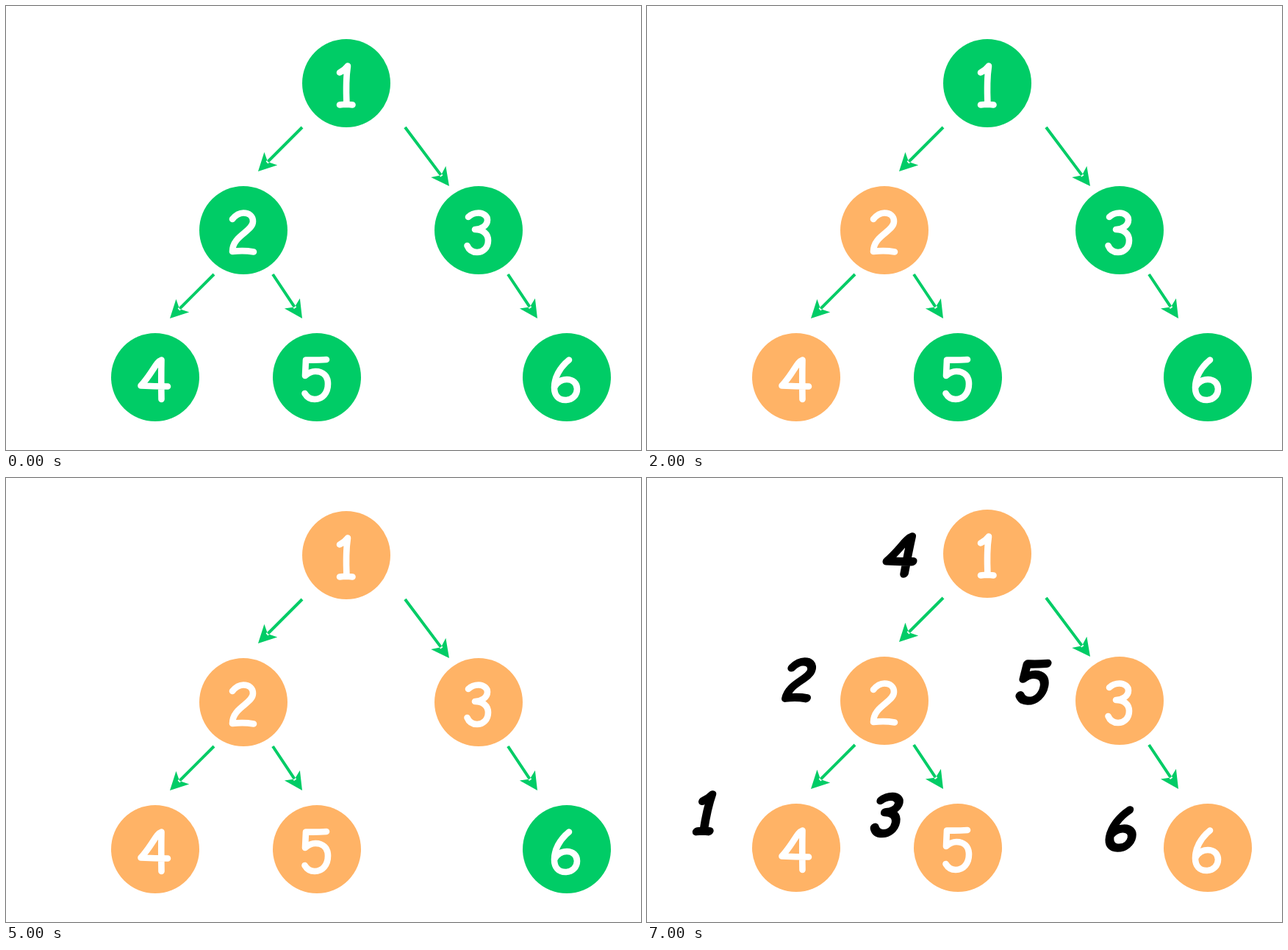
An HTML page that plays this animation: 864x604 px, repeating every 8000 ms.

```html
<!DOCTYPE html>
<html lang="en">
<head>
<meta charset="utf-8">
<title>In-order tree traversal</title>
<style>
  html, body { margin: 0; width: 100%; height: 100%; overflow: hidden; background: #fff; }
  svg { display: block; }
  .digit { fill: none; stroke: #fff; stroke-width: 8.6; stroke-linecap: round; stroke-linejoin: round; }
  .order .digit { stroke: #000; stroke-width: 12; }
</style>
</head>
<body>
<svg width="864" height="604" viewBox="0 0 864 604"><g id="tree"></g></svg>
<script>
const GREEN = '#00cc66', ORANGE = '#ffb366';
const STEP = 1000, LOOP = 8000;

// Hand-lettered digits as pen strokes around the centre of a node
const digits = {
  1: 'M-9,-14.5Q-2,-18 2,-23.5Q-1,-4 0.5,29M-9,29.5Q0,28 8.5,29.5',
  2: 'M-15,-15C-11,-20 -6,-23.5 0,-23.5C8,-23.5 13,-19 13,-12C13,2 -15,7 -15,29Q0,27 14,29.5',
  3: 'M-14,-18C-10,-22 -5,-23.5 0,-23.5C7,-23.5 12,-19 12,-14C12,-6 3,-1 -5,-1C6,-1 13,5 13,14C13,24 6,30 -2,30C-8,30 -13,27 -15.5,21',
  4: 'M8.5,30Q8,0 8.5,-23.5C1,-21 -4,-5 -19.5,11.5Q0,12.5 17,12.5',
  5: 'M13,-24Q-1,-23 -15,-23.5L-16,-2Q-9,-8 -2,-8C8,-8 15,-2 15,9C15,21 8,30 -3,30C-9,30 -13,28 -16.5,22',
  6: 'M3,-23.5C-10,-13 -17,1 -17,14C-17,25 -11,31 -2,31C8,31 14,24 14,16C14,8 8,3 0,3C-7,3 -13,7 -16.5,13'
};

// label, centre, position in the visiting order, place of the order number
const nodes = [
  { label: 1, x: 463, y: 105, order: 4, ox: 347.5, oy: 104 },
  { label: 2, x: 323, y: 305, order: 2, ox: 209, oy: 274 },
  { label: 3, x: 643, y: 305, order: 5, ox: 527.5, oy: 277 },
  { label: 4, x: 203, y: 505, order: 1, ox: 82, oy: 455 },
  { label: 5, x: 423, y: 505, order: 3, ox: 328.5, oy: 457.5 },
  { label: 6, x: 763, y: 505, order: 6, ox: 649, oy: 476 }
];

const arrows = [
  [403, 165, 343, 225], [543, 165, 603, 245],
  [283, 365, 223, 425], [363, 365, 403, 425], [683, 365, 723, 425]
];

const tree = document.getElementById('tree');

function add(parent, tag, attributes) {
  const element = document.createElementNS('http://www.w3.org/2000/svg', tag);
  for (const name in attributes) element.setAttribute(name, attributes[name]);
  return parent.appendChild(element);
}

function addDigit(parent, value, transform) {
  add(parent, 'path', { class: 'digit', d: digits[value], transform, role: 'img', 'aria-label': value });
}

for (const [x1, y1, x2, y2] of arrows) {
  const length = Math.hypot(x2 - x1, y2 - y1);
  const angle = Math.atan2(y2 - y1, x2 - x1) * 180 / Math.PI;
  add(tree, 'path', {
    d: `M${-length},-2H-17V2H${-length}ZM0,0L-24.5,-12.6L-18.5,0L-24.5,12.6Z`,
    fill: GREEN,
    transform: `translate(${x2} ${y2}) rotate(${angle})`
  });
}

const orderGroup = add(tree, 'g', { class: 'order' });
for (const node of nodes) {
  node.circle = add(tree, 'circle', { cx: node.x, cy: node.y, r: 60 });
  addDigit(tree, node.label, `translate(${node.x} ${node.y})`);
  addDigit(orderGroup, node.order,
    `translate(${node.ox} ${node.oy}) skewX(-11.3) scale(.97 .94)`);
}

function draw(now) {
  const step = Math.floor((now % LOOP) / STEP);
  const finished = step > nodes.length;
  for (const node of nodes) {
    node.circle.setAttribute('fill', step >= node.order ? ORANGE : GREEN);
  }
  orderGroup.setAttribute('visibility', finished ? 'visible' : 'hidden');
  tree.setAttribute('transform', `translate(0 ${finished ? -2 : 0})`);
}

function tick() {
  draw(performance.now());
  requestAnimationFrame(tick);
}
tick();
</script>
</body>
</html>
```
